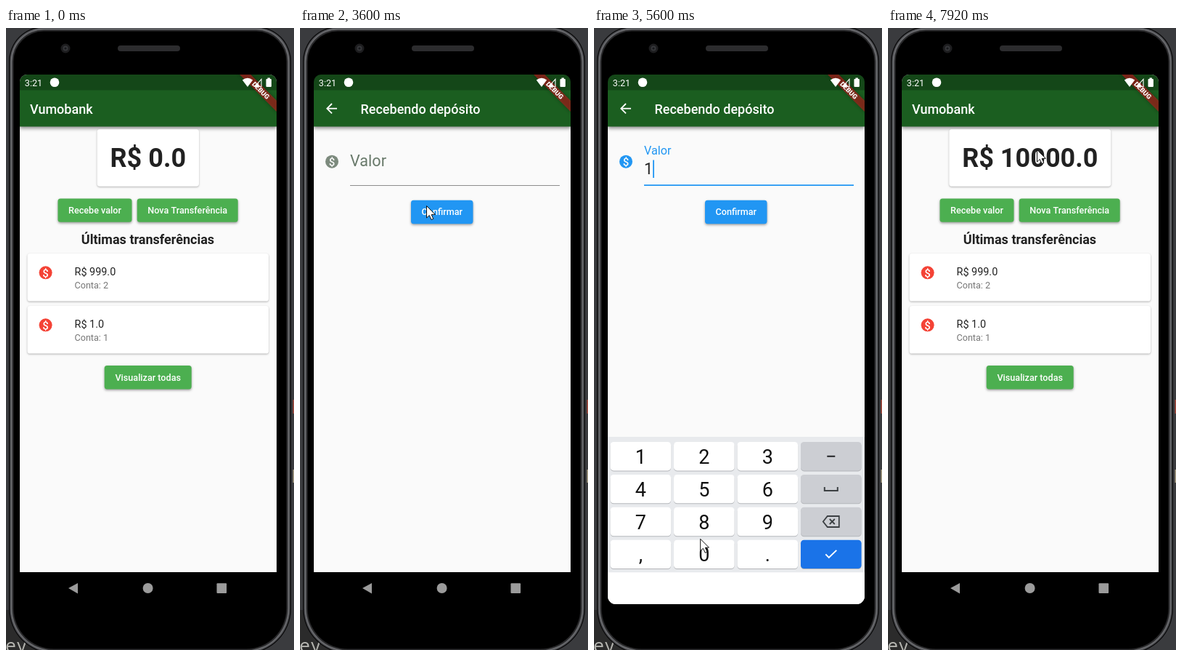
These frames come from a looping animation (397x855 px, 7990 ms). An HTML page with a canvas:

```html
<!DOCTYPE html>
<html lang="pt">
<head>
<meta charset="utf-8">
<title>Depósito</title>
<style>
html, body { margin: 0; width: 100%; height: 100%; overflow: hidden; background: #3a3b3e; }
canvas { display: block; width: 397px; height: 855px; }
</style>
</head>
<body>
<canvas id="stage"></canvas>
<script>
const W = 397, H = 855, LOOP = 7990;
const FONT = 'Roboto, sans-serif';
const GREEN = '#1b5e20', BUTTON = '#4caf50', BLUE = '#2196f3', PAPER = '#fafafa';
const ratio = Math.max(1, window.devicePixelRatio || 1);

function makeContext(canvas) {
  canvas.width = W * ratio;
  canvas.height = H * ratio;
  const c = canvas.getContext('2d');
  c.scale(ratio, ratio);
  return c;
}
const main = makeContext(document.getElementById('stage'));
const layer = makeContext(document.createElement('canvas'));
let g = main;

// --- timing helpers ---
const clamp = v => Math.min(1, Math.max(0, v));
const span = (t, from, to) => clamp((t - from) / (to - from));
const mix = (a, b, p) => a + (b - a) * p;

function bezier(x1, y1, x2, y2) {
  const at = (a, b, u) => 3 * a * u * (1 - u) ** 2 + 3 * b * u * u * (1 - u) + u ** 3;
  return x => {
    if (x <= 0 || x >= 1) return clamp(x);
    let lo = 0, hi = 1;
    for (let i = 0; i < 24; i++) {
      const mid = (lo + hi) / 2;
      if (at(x1, x2, mid) < x) lo = mid; else hi = mid;
    }
    return at(y1, y2, (lo + hi) / 2);
  };
}
const fastOutSlowIn = bezier(.4, 0, .2, 1);
const easeIn = bezier(.42, 0, 1, 1);

const RESTARTS = [0, 190, 950, 2900, 4360, 4420, 4990, 5190, 6010, 6280, 6420, 6550, 7090, 7850, 7920];
function snap(t) {
  const base = RESTARTS.filter(s => s <= t).pop();
  return base + Math.floor((t - base) / 70) * 70;
}

// Pointer path: time, x, y
const PATH = [
  [190, 368, 764], [540, 294, 570], [750, 331, 488], [950, 331, 488],
  [1720, 146, 241], [1790, 146, 238], [1930, 80, 180], [2070, 16, 232],
  [2210, 100, 303], [2350, 223, 250], [2450, 190, 174], [2560, 120, 231],
  [2700, 93, 253], [3250, 93, 253], [3600, 174, 244], [3740, 160, 200],
  [4080, 160, 200], [4360, 130, 505], [4490, 133, 592], [4840, 63, 603],
  [5260, 63, 603], [5600, 164, 723], [6500, 164, 723], [7020, 178, 250],
  [7400, 178, 250], [7850, 211, 187], [7920, 205, 167]
];
function pointerAt(t) {
  const i = PATH.findIndex(p => p[0] > t);
  if (i < 0) return PATH[PATH.length - 1].slice(1);
  const a = PATH[i - 1], b = PATH[i], p = span(t, a[0], b[0]);
  return [mix(a[1], b[1], p), mix(a[2], b[2], p)];
}

const FOCUS = 3880;
const TYPED = [5190, 5680, 5840, 6010, 6280];

// --- drawing helpers ---
function box(x, y, w, h, r, fill) {
  g.fillStyle = fill;
  g.beginPath();
  g.roundRect(x, y, w, h, r);
  g.fill();
}
function disc(x, y, r, fill) {
  g.fillStyle = fill;
  g.beginPath();
  g.arc(x, y, r, 0, 7);
  g.fill();
}
function poly(points, fill) {
  g.beginPath();
  points.forEach(([x, y]) => g.lineTo(x, y));
  g.closePath();
  if (fill) { g.fillStyle = fill; g.fill(); }
}
function line(points, color, width) {
  g.beginPath();
  points.forEach(([x, y]) => g.lineTo(x, y));
  g.strokeStyle = color;
  g.lineWidth = width;
  g.stroke();
}
function text(str, x, y, size, color, weight = 400, align = 'left', font = FONT) {
  g.font = `${weight} ${size}px ${font}`;
  g.textAlign = align;
  g.fillStyle = color;
  g.fillText(str, x, y);
}
function raised(draw, alpha, blur, dy) {
  g.save();
  g.shadowColor = `rgba(0,0,0,${alpha})`;
  g.shadowBlur = blur * ratio;
  g.shadowOffsetY = dy * ratio;
  draw();
  g.restore();
}
function clipped(x, y, w, h, r, draw) {
  g.save();
  g.beginPath();
  g.roundRect(x, y, w, h, r);
  g.clip();
  draw();
  g.restore();
}
function card(x, y, w, h) {
  raised(() => box(x, y, w, h, 3.6, '#fff'), .3, 2.5, 1);
}
function button(label, x, y, w, color, t, tap, px, py) {
  raised(() => box(x, y, w, 32.4, 3.6, color), .38, 3.5, 1.6);
  text(label, x + w / 2, y + 20.6, 12.62, '#fff', 500, 'center');
  const age = t - tap;
  if (age < 0 || age > 450) return;
  const fade = .24 * (1 - span(age, 250, 450));
  clipped(x, y, w, 32.4, 3.6, () =>
    disc(px, py, mix(10, w, span(age, 0, 225)), `rgba(255,255,255,${fade})`));
}
function coin(x, y, color, sign) {
  disc(x, y, 9, color);
  text('$', x, y + 5.4, 15, sign, 500, 'center');
}
function appBar(title, x) {
  raised(() => box(19, 64, 354, 71.5, 0, GREEN), .45, 5, 2);
  text(title, x, 117.5, 18.03, '#fff', 500);
}

// --- pages ---
function transfer(y, amount, account) {
  card(29.5, y, 332.5, 65.5);
  coin(54.6, y + 26.3, '#f44336', '#fff');
  text(amount, 94.5, y + 30, 14.42, 'rgba(0,0,0,.87)');
  text(account, 94.5, y + 48, 12.62, 'rgba(0,0,0,.54)');
}
function homePage(t) {
  box(19, 64, 354, 684, 0, PAPER);
  appBar('Vumobank', 33);
  const rich = t > 7050, half = rich ? 111.5 : 70.2;
  card(195.8 - half, 139.3, half * 2, 78.4);
  text(rich ? 'R$ 10000.0' : 'R$ 0.0', 195.8, 191, 36.06, 'rgba(0,0,0,.87)', 700, 'center');
  button('Recebe valor', 71.5, 234.4, 102, BUTTON, t, 2900, 93, 253);
  button('Nova Transferência', 180.7, 234.4, 139, BUTTON, t, Infinity);
  text('Últimas transferências', 195.5, 296.5, 18.03, 'rgba(0,0,0,.87)', 700, 'center');
  transfer(310, 'R$ 999.0', 'Conta: 2');
  transfer(382, 'R$ 1.0', 'Conta: 1');
  button('Visualizar todas', 135.7, 464, 120, BUTTON, t, Infinity);
}

function depositPage(t) {
  box(19, 64, 354, 684, 0, PAPER);
  appBar('Recebendo depósito', 83.5);
  line([[51, 110.7], [37.5, 110.7]], '#fff', 1.8);
  line([[44, 104], [37.3, 110.7], [44, 117.4]], '#fff', 1.8);

  const focused = t >= FOCUS, p = fastOutSlowIn(span(t, FOCUS, FOCUS + 200));
  coin(44, 183.7, focused ? BLUE : '#7c8a7d', PAPER);
  text('Valor', 69, mix(190, 174, p), mix(21.63, 16.2, p), focused ? BLUE : '#68796a');
  box(69, focused ? 215.2 : 216, 289, focused ? 1.8 : 1, 0, focused ? BLUE : '#8c8c8c');

  const count = TYPED.filter(s => s <= t).length;
  const value = '10000'.slice(0, count);
  if (count) text(value, 69, 201, 21.63, 'rgba(0,0,0,.87)');
  else if (focused) {
    g.globalAlpha = p;
    text('0.00', 69, 201, 21.63, '#707070');
    g.globalAlpha = 1;
  }
  if (focused) {
    const since = count ? TYPED[count - 1] : 3990;
    const on = Math.floor(Math.max(0, t - since) / 500) % 2 === 0;
    g.font = `400 21.63px ${FONT}`;
    if (on) box(69 + g.measureText(value).width, 181.5, 1.8, 24.5, 0, BLUE);
  }
  button('Confirmar', 153, 236.8, 85.5, BLUE, t, 7060, 178, 250);
}

// --- keyboard ---
const KEYS = ['1', '2', '3', '–', '4', '5', '6', 'space', '7', '8', '9', 'back', ',', '0', '.', 'done'];
const KEY_ICONS = {
  space: (x, y) => line([[x - 9, y - 2.5], [x - 9, y + 2.5], [x + 9, y + 2.5], [x + 9, y - 2.5]], '#3c4043', 2),
  back: (x, y) => {
    poly([[x - 11, y], [x - 5, y - 7.5], [x + 11, y - 7.5], [x + 11, y + 7.5], [x - 5, y + 7.5]]);
    g.strokeStyle = '#3c4043';
    g.lineWidth = 1.8;
    g.stroke();
    line([[x - 2, y - 3.5], [x + 5, y + 3.5]], '#3c4043', 1.8);
    line([[x - 2, y + 3.5], [x + 5, y - 3.5]], '#3c4043', 1.8);
  },
  done: (x, y) => line([[x - 7.5, y], [x - 3, y + 4.5], [x + 7.5, y - 5.5]], '#fff', 2)
};
function keyboard(t) {
  const up = t < 6000 ? fastOutSlowIn(span(t, 3920, 4180)) : 1 - easeIn(span(t, 7130, 7400));
  if (up <= 0) return;
  const press = TYPED.findIndex(s => t >= s && t < s + 80);
  const pressed = press < 0 ? '' : '10000'[press];
  clipped(19, 64, 354, 728, [10, 10, 11, 11], () => {
    box(19, 748, 354, 44, 0, '#fff');
    g.translate(0, (1 - up) * 230);
    box(19, 562, 354, 186.5, 0, '#e8eaed');
    box(19, 748.5, 354, 44, 0, '#fff');
    KEYS.forEach((key, i) => {
      const x = 22.5 + i % 4 * 87.5, y = 569 + Math.floor(i / 4) * 44.9;
      const cx = x + 41.8, cy = y + 19.7;
      let fill = i % 4 < 3 ? '#fff' : key === 'done' ? '#1a73e8' : '#ccced3';
      if (key === pressed) fill = '#d8dade';
      box(x, y + 1, 83.6, 39.4, 4.5, '#b4b6ba');
      box(x, y, 83.6, 39.4, 4.5, fill);
      if (KEY_ICONS[key]) KEY_ICONS[key](cx, cy);
      else if (key === '–') box(cx - 5.5, cy - 1, 11, 2, 0, '#202124');
      else text(key, cx, cy + 10, 27, '#111', 400, 'center');
    });
  });
}

// --- phone and system parts ---
function phone() {
  box(0, 0, W, H, 0, '#3a3b3e');
  box(0, 800, 60, 55, 0, '#2b2b2b');
  text('ey', -1, 858, 25, '#b5b5b0', 400, 'left', '"Noto Sans Mono", monospace');
  box(395.5, 511, 1.5, 19, 0, '#a2463a');
  box(395.5, 607, 1.5, 18, 0, '#a39a80');
  const rims = [[4, '#0c0c0d'], [5.5, '#55565a'], [7, '#6c6d70'], [8.5, '#2a2a2c'], [10.5, '#000']];
  rims.forEach(([d, color]) => {
    const top = 52 - d, bottom = 66 - d;
    box(d, d - 6, W - 2 * d, 870 - 2 * d, [top, top, bottom, bottom], color);
  });
  disc(82, 28, 6.5, '#1d1d1f');
  disc(82, 28, 3.5, '#36373a');
  disc(82, 28, 1.6, '#17181b');
  box(154, 24, 86, 8, 4, '#2c2c2e');
  poly([[86, 770], [99, 763], [99, 777.5]], '#9b9b9b');
  disc(195.6, 770, 7, '#9b9b9b');
  box(290.5, 763.3, 13.6, 13.6, 1, '#9b9b9b');
}
function banner() {
  g.save();
  g.translate(373, 64);
  g.rotate(Math.PI / 4);
  raised(() => box(-37, 25.2, 74, 10.8, 0, 'rgba(183,28,28,.63)'), .5, 5, 0);
  text('DEBUG', 0, 34, 9.2, '#fff', 900, 'center');
  g.restore();
}
function statusBar() {
  box(19, 64, 354, 21.6, 0, 'rgba(0,0,0,.25)');
  banner();
  text('3:21', 25.8, 79.5, 12.62, '#fff');
  disc(67, 74.8, 6.3, '#fff');
  g.fillStyle = '#fff';
  g.beginPath();
  g.moveTo(333, 81);
  g.lineTo(325.8, 71.5);
  g.quadraticCurveTo(333, 66, 340.2, 71.5);
  g.fill();
  poly([[342.8, 80.5], [352, 70.5], [352, 80.5]]);
  g.strokeStyle = '#fff';
  g.lineWidth = 1.1;
  g.stroke();
  poly([[343, 80.5], [348, 75], [348, 80.5]], '#fff');
  box(358.5, 70, 7.4, 11, 1, '#fff');
  box(360.5, 68.6, 3.4, 2, 0, '#fff');
}
function pointer(t) {
  if (t < 190) return;
  const [x, y] = pointerAt(t);
  g.save();
  g.translate(x + .5, y + .5);
  g.lineJoin = 'miter';
  poly([[0, 0], [0, 16.5], [3.8, 13], [6.5, 19], [9.3, 17.8], [6.7, 12], [11.8, 11.8]], '#fff');
  g.strokeStyle = '#111';
  g.lineWidth = 1;
  g.stroke();
  g.restore();
}

function render(now) {
  const t = snap(now);
  g = main;
  g.clearRect(0, 0, W, H);
  phone();
  const route = t < 5000 ? span(t, 2995, 3295) : 1 - span(t, 7110, 7410);
  clipped(19, 64, 354, 684, [10, 10, 0, 0], () => {
    if (route < 1) homePage(t);
    if (route > 0) {
      g = layer;
      g.clearRect(0, 0, W, H);
      clipped(19, 64, 354, 684, 0, () => depositPage(t));
      g = main;
      g.globalAlpha = easeIn(route);
      g.drawImage(layer.canvas, 0, (1 - fastOutSlowIn(route)) * 171, W, H);
      g.globalAlpha = 1;
    }
    statusBar();
  });
  keyboard(t);
  pointer(t);
}

const start = performance.now();
function tick() {
  render((performance.now() - start) % LOOP);
  requestAnimationFrame(tick);
}
tick();
</script>
</body>
</html>
```
